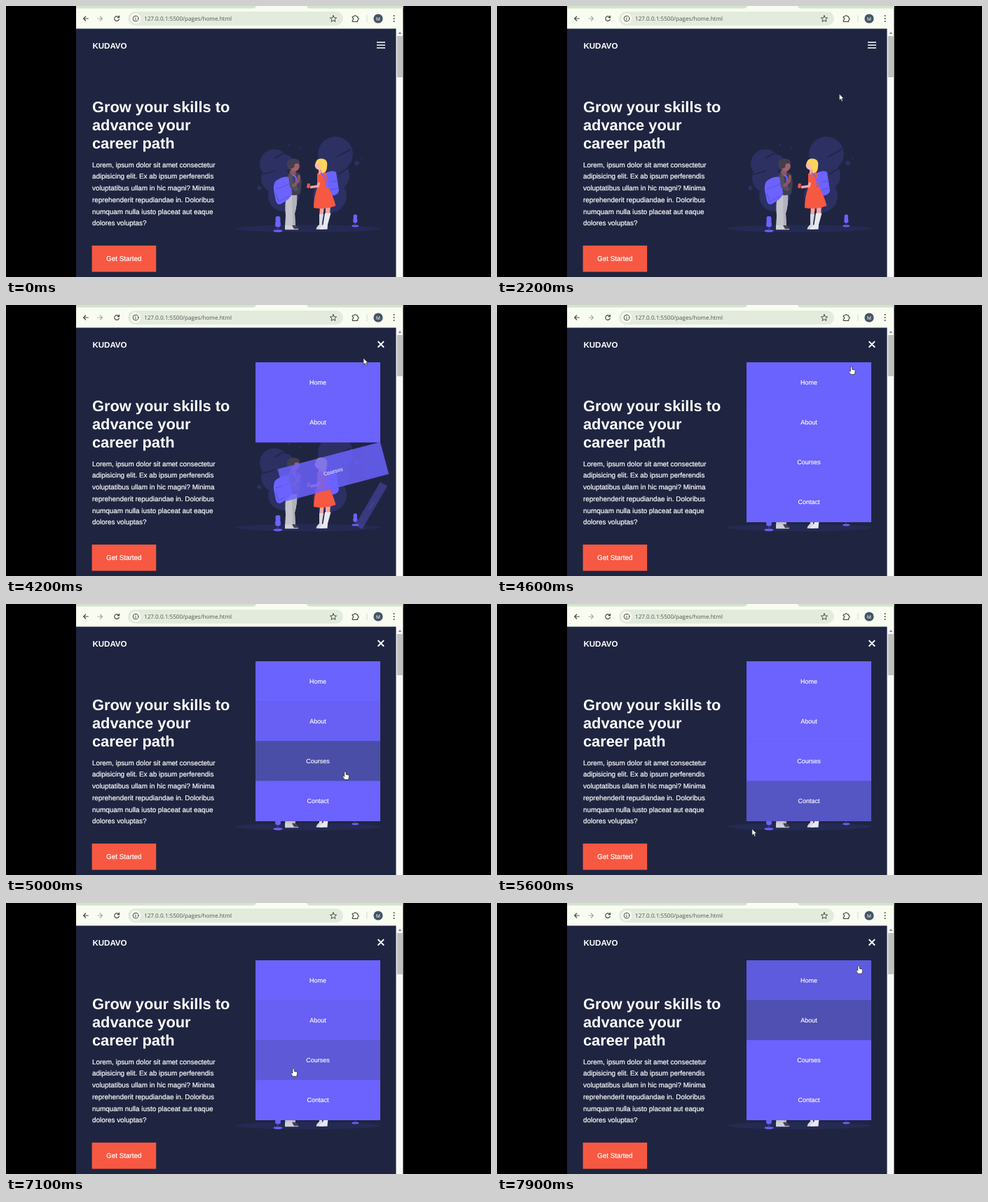
An HTML page that plays this animation: 692 px wide and 388 px high, repeating every 8 s.

```html
<!DOCTYPE html>
<html lang="en">
<head>
<meta charset="utf-8">
<title>Landing page menu</title>
<style>
  html, body { margin: 0; width: 100%; height: 100%; overflow: hidden; background: #000; }
  svg { display: block; width: 692px; height: 388px; }
  text { font-family: "Liberation Sans", Arial, sans-serif; fill: #fff; text-rendering: geometricPrecision; }
  .url { font-family: "Open Sans", sans-serif; font-size: 8.15px; fill: #50544c; }
  .logo { font-weight: bold; font-size: 11.5px; }
  .title { font-weight: bold; font-size: 21.8px; }
  .body { font-size: 9.9px; stroke: #fff; stroke-width: .2px; }
  .item { font-size: 9px; text-anchor: middle; stroke: #fff; stroke-width: .15px; }
  .icon { fill: none; stroke: #474b44; stroke-width: 1.2; stroke-linecap: round; stroke-linejoin: round; }
</style>
</head>
<body>
<svg id="stage" viewBox="0 0 692 388" xmlns="http://www.w3.org/2000/svg">
  <rect width="692" height="388" fill="#000"/>

  <!-- browser bar -->
  <rect x="100" width="466.5" height="33" fill="#f8fcf1"/>
  <path d="M100 0H357Q356 3.5 352 3.5H100ZM429 0H566.5V3.5H434Q430 3.5 429 0Z" fill="#d3e4cb"/>
  <rect x="174" y="8" width="307" height="20" rx="10" fill="#e3ebdd"/>
  <circle cx="185" cy="18" r="7.4" fill="#f8fcf1"/>
  <g class="icon">
    <path d="M117.3 18H110.7M113.6 15L110.6 18L113.6 21"/>
    <path d="M131 18H137.3M134.4 15L137.4 18L134.4 21" stroke="#a9ada5"/>
    <path d="M161.1 16.3A3.4 3.4 0 1 0 161.4 19M161.5 14.2V16.6H159.1"/>
    <circle cx="185" cy="18" r="3.9" stroke-width="1"/>
    <path d="M185 17.8V19.9M185 16V16.1" stroke-width="1"/>
    <path d="M467 13.6L468.3 16.7L471.6 17L469.1 19.2L469.9 22.4L467 20.7L464.1 22.4L464.9 19.2L462.4 17L465.7 16.7Z" stroke-width="1"/>
    <path d="M494.3 15H496.7A1.5 1.5 0 0 1 499.7 15H501.7V17A1.5 1.5 0 0 1 501.7 20V22.3H494.3V20A1.5 1.5 0 0 0 494.3 17Z"/>
  </g>
  <path d="M515 13V23" stroke="#cfe0c6"/>
  <circle cx="531" cy="18" r="6.6" fill="#465564"/>
  <text x="531" y="20.6" font-size="7" text-anchor="middle">M</text>
  <g fill="#474b44"><circle cx="553.6" cy="14" r="1"/><circle cx="553.6" cy="18" r="1"/><circle cx="553.6" cy="22" r="1"/></g>
  <text class="url" x="197" y="21.2">127.0.0.1:5500/pages/home.html</text>

  <!-- page -->
  <rect x="556" y="32.5" width="10.5" height="355.5" fill="#f9f9f9"/>
  <rect x="100" y="32.5" width="456.5" height="355.5" fill="#1f2540"/>
  <path d="M559.6 40L562 37L564.4 40Z" fill="#8a8a8a"/>
  <rect x="557.8" y="43" width="8.4" height="59" fill="#c1c1c1"/>
  <text class="logo" x="123.5" y="61.4">KUDAVO</text>
  <g id="copy"></g>
  <rect x="122.6" y="343" width="91.6" height="37.6" fill="#f75842"/>
  <text class="body" x="143" y="365.2">Get Started</text>

  <!-- illustration -->
  <ellipse cx="431" cy="318.7" rx="103" ry="5.2" fill="#252a54"/>
  <g fill="#2c3063">
    <circle cx="383" cy="226" r="21"/><circle cx="384" cy="247" r="20"/>
    <circle cx="396" cy="272" r="22"/><circle cx="400" cy="222" r="9"/>
    <circle cx="470" cy="212" r="25"/><circle cx="468" cy="243" r="22"/>
    <circle cx="462" cy="272" r="24"/>
    <circle cx="361.5" cy="260.5" r="3"/><circle cx="500.5" cy="225" r="3.4"/>
    <circle cx="404" cy="199" r="1.3"/><circle cx="420" cy="204" r="1.3"/><circle cx="508" cy="219" r="1"/>
  </g>
  <path d="M383 218L402 207M366 241L384 236M472 216L492 205M474 241L491 230" stroke="#1f2540" stroke-width="1.5"/>
  <g id="plants"></g>

  <!-- boy -->
  <path d="M401 267L415 267Q416 283 412 297L413 316H398L399 300Q397 284 401 267Z" fill="#c3c3cb"/>
  <path d="M408 270L415 269Q416 285 412 297L413 315H409Z" fill="#b2b2bc"/>
  <path d="M398 314H407L417 319V320.3H398Z" fill="#cfcfd8"/>
  <path d="M408 314H413L418.5 319.2H411Z" fill="#45434f"/>
  <path d="M402 240Q411 235 419 240L422 252L420 269Q411 273 402 269Z" fill="#403e50"/>
  <path d="M404 236L414 235L413 242H406Z" fill="#8c555e"/>
  <circle cx="411.5" cy="229.5" r="7.3" fill="#a0616a"/>
  <path d="M401 229Q400 219 410 218.5Q419 218.5 419.5 225L412 226L411 231L407 233L404 235Z" fill="#403e50"/>
  <path d="M387 249Q399 242 405 246L408 268Q407 276 393 283Q387 286 385 279L382 264Q381 252 387 249Z" fill="#6c63ff"/>
  <path d="M385 262Q397 259 407 253M385 268L389 280L404 272" fill="none" stroke="#574fd9" stroke-width="1"/>
  <path d="M404 245Q412 239 414 247L413 263" fill="none" stroke="#6c63ff" stroke-width="2"/>
  <path d="M406 244L408 258L414 262" fill="none" stroke="#514f62" stroke-width="6" stroke-linecap="round" stroke-linejoin="round"/>
  <path d="M410 257L417 251L418 244" fill="none" stroke="#8c555e" stroke-width="4" stroke-linecap="round" stroke-linejoin="round"/>

  <!-- girl -->
  <path d="M448 286H454L452 304H447ZM456 285H463L462 300H456Z" fill="#f2a7a4"/>
  <path d="M447 298H453L451 312L453 319.8H442.5Q443 316 447 313Z" fill="#d8d8e2"/>
  <path d="M455 296.5H463.5L459 313L458.5 319.8H446.5Q448 316.5 452.5 313Z" fill="#e8e8f0"/>
  <path d="M456 239Q467 234 471 238L475 264Q474 272 460 272Z" fill="#6c63ff"/>
  <path d="M464 252L474 250M463 263L475 261" stroke="#574fd9" fill="none"/>
  <path d="M444 240Q450 235 457 239L459 258Q467 272 470.5 286Q455 292 439 289Q439 274 444 260Z" fill="#f75842"/>
  <path d="M446 229H452V240L446 241Z" fill="#eaa09e"/>
  <circle cx="447.5" cy="228" r="6.8" fill="#ffb9b0"/>
  <path d="M442 226Q442 218 450 218.5Q460 219 458 230Q458 239 451 239Q451 234 447 229Q447 225 442 226Z" fill="#ffd45a"/>
  <path d="M449 244L445 258L434 259.5" fill="none" stroke="#f2a7a4" stroke-width="3.6" stroke-linejoin="round"/>
  <path d="M450 242L447 253" stroke="#f75842" stroke-width="5"/>
  <path d="M430 254L434 254.5L433 261L429 260Z" fill="#f75842"/>
  <path d="M449 239Q458 244 457 260" fill="none" stroke="#6c63ff" stroke-width="2"/>

  <g id="menu"></g>
  <path id="burger" d="M529 52H541M529 56H541M529 60H541" stroke="#fff" stroke-width="1.7"/>
  <path id="cross" d="M531.2 52.6L538.6 60M538.6 52.6L531.2 60" stroke="#fff" stroke-width="2" stroke-linecap="round"/>
  <g id="cursor" stroke="#222" stroke-width=".7" fill="#fff" stroke-linejoin="round">
    <path id="arrow" d="M0 0V9.2L2.1 7.3L3.6 10.6L5.2 9.9L3.8 6.7H6.6Z"/>
    <path id="hand" d="M-1.2 .6Q0 -.8 1.2 .6V4L4.8 4.8Q5.8 5.2 5.6 6.6L4.8 11.2H-.8L-3.6 7.2Q-3.6 5.6 -2.2 6.2L-1.2 7.2Z"/>
  </g>
</svg>
<script>
const LOOP = 8000, ROW = 57.1, TOP = 82, LEFT = 356, RIGHT = 534;
const OPEN = 3467, STEP = 200, SPIN = 400, FADE = 400, SHOWN = 2200;
const labels = ["Home", "About", "Courses", "Contact"];
const $ = id => document.getElementById(id);
const clamp = v => Math.min(1, Math.max(0, v));
const show = (el, on) => el.setAttribute("visibility", on ? "visible" : "hidden");

const lines = (rows, cls, y, gap) => rows.map((row, i) =>
  `<text class="${cls}" x="123" y="${y + i * gap}">${row}</text>`).join("");

$("copy").innerHTML =
  lines(["Grow your skills to", "advance your", "career path"], "title", 151.5, 26.2) +
  lines(["Lorem, ipsum dolor sit amet consectetur",
    "adipisicing elit. Ex ab ipsum perferendis",
    "voluptatibus ullam in hic magni? Minima",
    "reprehenderit repudiandae in. Doloribus",
    "numquam nulla iusto placeat aut eaque",
    "dolores voluptas?"], "body", 230.6, 16.75);

const plant = (x, y, k) => `<g transform="translate(${x} ${y}) scale(${k})" fill="#6c63ff">
  <ellipse rx="6.5" ry="1.8"/><path d="M0 0V-16" stroke="#4a45a8"/>
  <rect x="-3.4" y="-21" width="6.8" height="9" rx="2.6"/><rect x="-3.9" y="-14" width="7.8" height="8.5" rx="3"/></g>`;
$("plants").innerHTML = plant(388, 322, 1) + plant(498.3, 315, 0.78);

// each row is drawn relative to its top right corner
const rows = labels.map(label => {
  const g = document.createElementNS("http://www.w3.org/2000/svg", "g");
  g.innerHTML = `<rect x="${LEFT - RIGHT}" width="${RIGHT - LEFT}" height="${ROW + 0.6}"/>
    <text class="item" x="-89" y="31.8">${label}</text>`;
  $("menu").append(g);
  return g;
});

// pointer path: time, x, y
const path = [
  [2200, 488, 126], [2300, 515, 108], [2500, 515, 108], [2850, 535, 56], [3800, 535, 56],
  [4200, 510, 76], [4500, 508, 78], [4590, 506, 82], [4690, 502, 139], [4800, 494, 196],
  [5000, 484, 240], [5115, 476, 253.5], [5490, 392, 311], [5600, 364, 322], [5800, 345, 338],
  [6200, 345, 338], [6450, 330, 250], [6900, 345, 185], [6960, 357, 190], [7015, 373, 197],
  [7100, 410, 237], [7200, 418, 232], [7350, 432, 195], [7600, 470, 168], [7820, 506, 139],
  [7900, 516, 90], [8000, 518, 86]
];
function pointer(t) {
  const i = path.findIndex(p => p[0] > t);
  if (i < 1) return path[0].slice(1);
  const [a, x0, y0] = path[i - 1], [b, x1, y1] = path[i], k = (t - a) / (b - a);
  return [x0 + (x1 - x0) * k, y0 + (y1 - y0) * k];
}
function rowAt(t) {
  const [x, y] = pointer(t);
  if (t < OPEN + 3 * STEP + SPIN || x < LEFT || x > RIGHT) return -1;
  const i = Math.floor((y - TOP) / ROW);
  return i >= 0 && i < labels.length ? i : -1;
}

// times at which each row gains or loses the pointer
const flips = labels.map(() => []);
for (let t = 0, last = -1; t < LOOP; t += 5) {
  const now = rowAt(t);
  if (now === last) continue;
  if (last >= 0) flips[last].push([t, 0]);
  if (now >= 0) flips[now].push([t, 1]);
  last = now;
}

// cubic-bezier(.25, .1, .25, 1)
function ease(x) {
  let lo = 0, hi = 1;
  const bez = (u, a, b) => 3 * u * (1 - u) ** 2 * a + 3 * u * u * (1 - u) * b + u ** 3;
  for (let n = 0; n < 18; n++) {
    const mid = (lo + hi) / 2;
    if (bez(mid, 0.25, 0.25) < x) lo = mid; else hi = mid;
  }
  return bez(lo, 0.1, 1);
}
function hover(i, t) {
  let level = 0;
  flips[i].forEach(([at, goal], n, all) => {
    if (at > t) return;
    const end = Math.min(t, n + 1 < all.length ? all[n + 1][0] : t);
    level += (goal - level) * ease(clamp((end - at) / FADE));
  });
  return level;
}
const mix = k => `rgb(${[108, 99, 255].map((c, i) => Math.round(c + ([66, 72, 144][i] - c) * k))})`;

function draw(t) {
  rows.forEach((g, i) => {
    const p = clamp((t - OPEN - i * STEP) / SPIN), turn = 90 * (1 - p), s = 0.1 + 0.9 * p;
    show(g, p > 0);
    g.setAttribute("opacity", p);
    g.setAttribute("transform", `translate(${RIGHT} ${TOP + i * ROW}) rotate(${-turn}) ` +
      `scale(${s} ${s * Math.cos(turn * Math.PI / 180)})`);
    g.firstChild.setAttribute("fill", mix(hover(i, t)));
  });
  const open = t >= OPEN;
  show($("burger"), !open);
  show($("cross"), open);

  const [x, y] = pointer(t), seen = t >= SHOWN;
  const link = rowAt(t) >= 0 || (Math.abs(x - 535) < 7 && Math.abs(y - 56) < 7);
  $("cursor").setAttribute("transform", `translate(${x} ${y})`);
  show($("arrow"), seen && !link);
  show($("hand"), seen && link);
}

const start = performance.now();
function tick() {
  draw((performance.now() - start) % LOOP);
  requestAnimationFrame(tick);
}
tick();
</script>
</body>
</html>
```
